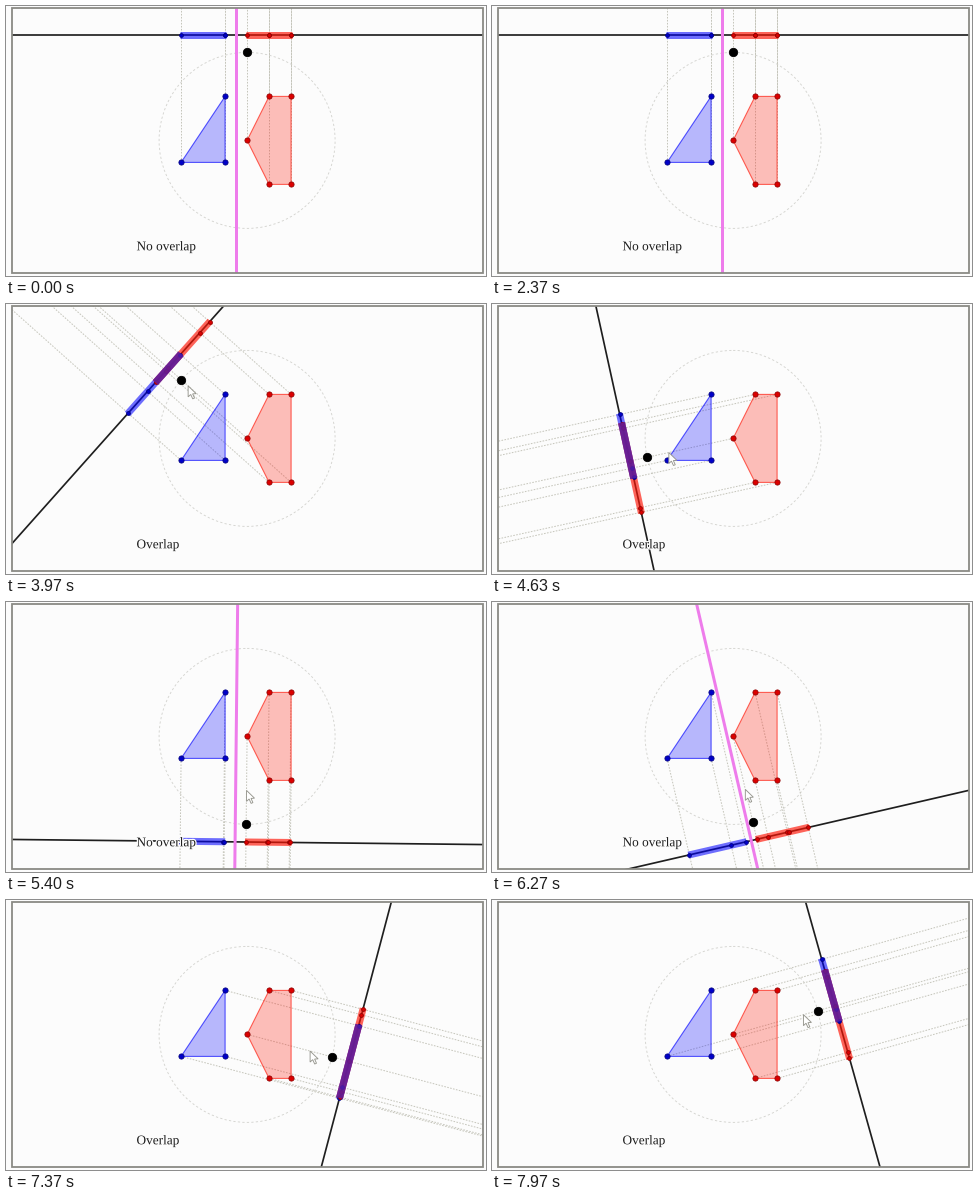
Write a matplotlib script that moves like this. It is 480 px wide and 270 px high and loops after 8000 ms.

```python
import numpy as np
import matplotlib.pyplot as plt
from matplotlib.animation import FuncAnimation
from matplotlib.patches import Circle, Polygon, Rectangle
from matplotlib.patheffects import withStroke

W, H = 480, 270
FRAMES, STEP = 400, 20
PX = 0.72                      # points per pixel at 100 dpi
CENTER = np.array([241.1, 134.4])
UNIT, RADIUS, AXIS_DIST = 22, 88, 105.6
APPEAR, GRAB = 2530, 3050      # pointer shows up, drag starts
PAPER, INK = "#fcfcfc", "#1e1e1e"

BLUE = CENTER + UNIT * np.array([(-1, -2), (-3, 1), (-1, 1)])
RED = CENTER + UNIT * np.array([(0, 0), (1, -2), (2, -2), (2, 2), (1, 2)])

# key poses of the drag: time and direction in degrees
TIMES = np.array([GRAB, 3970, 4630, 5000, 6270, 7370, 8000])
ANGLES = np.array([90, 138.3, 192.4, 260, 283, 345.2, 377.2])
RATES = np.diff(ANGLES) / np.diff(TIMES)
SLOPES = np.concatenate([[0], 2 / (1 / RATES[1:] + 1 / RATES[:-1]), RATES[-1:]])


def angle(t):
    """Monotone cubic through the key poses."""
    t = np.clip(t, TIMES[0], TIMES[-1])
    i = min(np.searchsorted(TIMES, t, "right"), len(TIMES) - 1) - 1
    h = TIMES[i + 1] - TIMES[i]
    u = (t - TIMES[i]) / h
    v = 1 - u
    return (v * v * ((1 + 2 * u) * ANGLES[i] + u * h * SLOPES[i])
            + u * u * ((1 + 2 * v) * ANGLES[i + 1] - v * h * SLOPES[i + 1]))


fig = plt.figure(figsize=(W / 100, H / 100), dpi=100, facecolor=PAPER)
ax = fig.add_axes([0, 0, 1, 1])
ax.set_xlim(0, W)
ax.set_ylim(H, 0)
ax.axis("off")

frame = Rectangle((5.5, 1.7), 471.3, 265, fill=False, ec="#8a8a84",
                  lw=1.8 * PX, zorder=20)
ax.add_patch(frame)


def line(color, width, z, **kw):
    art, = ax.plot([], [], color=color, lw=width * PX, zorder=z,
                   solid_capstyle="butt", **kw)
    art.set_clip_path(frame)
    return art


def dots(color, edge, size, z):
    art, = ax.plot([], [], "o", ms=size * PX, mfc=color, mec=edge,
                   mew=0.8 * PX, zorder=z)
    return art


def span(art, start, end):
    art.set_data([start[0], end[0]], [start[1], end[1]])


class Shape:
    """A polygon with its projection on the axis."""

    def __init__(self, pts, fill, dot, rim, bar_alpha):
        self.pts = pts
        ax.add_patch(Polygon(pts, fc=fill, alpha=0.27, lw=0, zorder=3))
        ax.add_patch(Polygon(pts, fill=False, ec=fill, alpha=0.65,
                             lw=1.1 * PX, zorder=3))
        dots(dot, rim, 5.2, 9).set_data(*pts.T)
        self.rays = [line("#c6c6bc", 1, 2, ls=(0, (1.6, 1.4))) for _ in pts]
        self.bar = line(fill, 7, 5, alpha=bar_alpha)
        self.feet = dots(dot, rim, 3.8, 5.5)

    def project(self, d, along, base):
        s = (self.pts - CENTER) @ along
        for ray, p in zip(self.rays, self.pts):
            span(ray, p, p + 600 * d)
        self.feet.set_data(*(base + np.outer(s, along)).T)
        span(self.bar, base + (s.min() - 1) * along, base + (s.max() + 1) * along)
        return s.min(), s.max()


ax.add_patch(Circle(CENTER, RADIUS, fill=False, ec="#d4d4d0", lw=0.9 * PX,
                    ls=(0, (2.5, 2.5)), zorder=1))
blue = Shape(BLUE, "#0000ff", "#0000c8", "#000080", 0.57)
red = Shape(RED, "#ff1404", "#dc0000", "#900000", 0.66)
axis = line(INK, 1.7, 4)
both_bar = line("#5a1ea0", 7, 6, alpha=0.85)
divider = line("#ee7ceb", 3, 8)
handle = dots("black", "black", 8.4, 10)
label = ax.text(130.5, 244.3, "", family="Liberation Serif", size=13.3 * PX,
                color=INK, zorder=11,
                path_effects=[withStroke(linewidth=2.5 * PX, foreground=PAPER)])

ARROW = np.array([(0, 0), (0, 11), (2.6, 8.6), (4.6, 13), (6.4, 12.2),
                  (4.5, 8), (8, 7.8)])
pointer = Polygon(ARROW, fc="white", ec="#96968e", lw=0.9 * PX, zorder=12)
ax.add_patch(pointer)


def place_pointer(t, d):
    reach = 69 - 15 * d[1]     # the hand cuts the lower half of the circle
    u = np.clip((t - APPEAR) / (GRAB - APPEAR), 0, 1)
    u = u * u * (3 - 2 * u)
    start = np.array([324, 103])
    pointer.set_xy(ARROW + start + u * (CENTER + reach * d - start))
    pointer.set_visible(t >= APPEAR)


def draw(i):
    t = (i + 0.5) * STEP
    a = np.radians(angle(t))
    d = np.array([np.cos(a), -np.sin(a)])
    along = np.array([-d[1], d[0]])
    base = CENTER + AXIS_DIST * d

    span(axis, base - 700 * along, base + 700 * along)
    handle.set_data(*(CENTER + RADIUS * d)[:, None])

    (b0, b1), (r0, r1) = (s.project(d, along, base) for s in (blue, red))
    lo, hi = max(b0, r0), min(b1, r1)
    overlap = lo < hi
    span(both_bar, base + (lo - 1) * along, base + (hi + 1) * along)
    mid = base + (lo + hi) / 2 * along
    span(divider, mid - 700 * d, mid + 700 * d)
    both_bar.set_visible(overlap)
    divider.set_visible(not overlap)
    label.set_text("Overlap" if overlap else "No overlap")
    place_pointer(t, d)
    return []


anim = FuncAnimation(fig, draw, frames=FRAMES, interval=STEP, repeat=True,
                     repeat_delay=0, init_func=lambda: draw(0))
plt.show()
```
